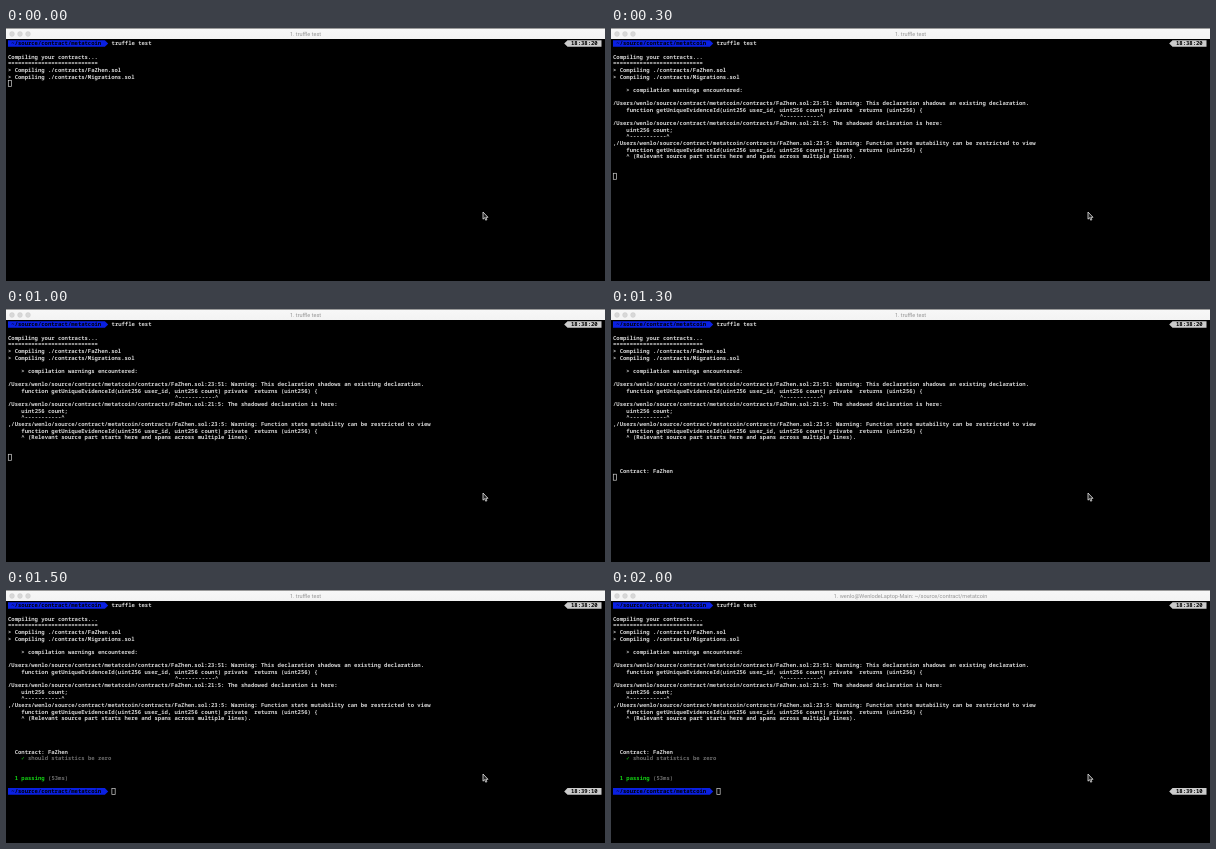
These frames come from a looping animation (599 by 253 pixels, 2100 ms). An HTML page:

```html
<!DOCTYPE html>
<html lang="en">
<head>
<meta charset="utf-8">
<title>Terminal</title>
<style>
  html, body { margin: 0; width: 100%; height: 100%; overflow: hidden; background: #000; }
  svg { display: block; width: 599px; height: 253px; }
  text { white-space: pre; text-rendering: geometricPrecision; }
  .mono { font: 600 5.568px "Noto Sans Mono", "DejaVu Sans Mono", monospace; fill: #d4d4d4; }
  .title { font: 5.55px Roboto, "Open Sans", sans-serif; fill: #959595; text-anchor: middle; }
  .mono.green { fill: #12d012; }
  .mono.dim { fill: #6c6c6c; }
  .mono.dark { fill: #000; }
</style>
</head>
<body>
<svg id="stage" viewBox="0 0 599 253">
  <defs>
    <linearGradient id="bar" x2="0" y2="1">
      <stop offset="0" stop-color="#f8f8f8"/>
      <stop offset="1" stop-color="#f3f3f3"/>
    </linearGradient>
  </defs>
  <rect width="599" height="253"/>
  <rect width="599" height="11" fill="url(#bar)"/>
  <rect width="599" height="0.8" fill="#858585"/>
  <g fill="#d8d8d8" stroke="#c6c6c6" stroke-width="0.4">
    <circle cx="6" cy="6" r="2.4"/>
    <circle cx="14" cy="6" r="2.4"/>
    <circle cx="22" cy="6" r="2.4"/>
  </g>
  <text id="title" class="title" x="299.5" y="8"></text>
  <g id="screen"></g>
  <rect id="caret" width="3.3" height="6" fill="none" stroke="#cfcfcf" stroke-width="0.7"/>
  <path d="M477 184v7.2l1.6-1.5 1.1 2.5 1.2-.5-1.1-2.4h2.2z" fill="#222" stroke="#e8e8e8" stroke-width="0.8"/>
</svg>
<script>
const LOOP = 2100, COL = 3.341, ROW = 6.64, LEFT = 2, TOP = 12.2;
const NS = "http://www.w3.org/2000/svg";
const screen = document.getElementById("screen");
const title = document.getElementById("title");
const caret = document.getElementById("caret");
const timed = [];

const colX = c => LEFT + c * COL;
const rowY = r => TOP + r * ROW;

function add(tag, at, attrs, content = "") {
  const el = document.createElementNS(NS, tag);
  for (const k in attrs) el.setAttribute(k, attrs[k]);
  el.textContent = content;
  screen.append(el);
  timed.push({ el, at });
}

function print(at, row, col, content, tone = "", x = colX(col)) {
  add("text", at, { x, y: rowY(row) + 5.25, class: "mono " + tone }, content);
}

function prompt(at, row, clock) {
  const y = rowY(row), h = ROW / 2, end = colX(29);
  add("path", at, { d: `M${LEFT} ${y}H${end}l3.3 ${h}l-3.3 ${h}H${LEFT}z`, fill: "#0a20e2" });
  print(at, row, 1, "~/source/contract/metatcoin", "dark");
  add("path", at, { d: `M595.5 ${y}H561.5l-3.3 ${h}l3.3 ${h}H595.5z`, fill: "#cbcbcb" });
  print(at, row, 0, clock, "dark", 565);
}

const file = "/Users/wenlo/source/contract/metatcoin/contracts/FaZhen.sol";
const code = "function getUniqueEvidenceId(uint256 user_id, uint256 count) private  returns (uint256) {";
const span = "^-----------^";

prompt(0, 0, "18:38:20");

// time, row, column, text, tone
[
  [0, 0, 31, "truffle test"],
  [0, 2, 0, "Compiling your contracts..."],
  [0, 3, 0, "=".repeat(27)],
  [0, 4, 0, "> Compiling ./contracts/FaZhen.sol"],
  [0, 5, 0, "> Compiling ./contracts/Migrations.sol"],
  [300, 7, 4, "> compilation warnings encountered:"],
  [300, 9, 0, file + ":23:51: Warning: This declaration shadows an existing declaration."],
  [300, 10, 4, code],
  [300, 11, 50, span],
  [300, 12, 0, file + ":21:5: The shadowed declaration is here:"],
  [300, 13, 4, "uint256 count;"],
  [300, 14, 4, span],
  [300, 15, 0, "," + file + ":23:5: Warning: Function state mutability can be restricted to view"],
  [300, 16, 4, code],
  [300, 17, 4, "^ (Relevant source part starts here and spans across multiple lines)."],
  [1300, 22, 2, "Contract: FaZhen"],
  [1400, 23, 4, "✓", "green"],
  [1400, 23, 6, "should statistics be zero", "dim"],
  [1400, 26, 2, "1 passing", "green"],
  [1400, 26, 12, "(53ms)", "dim"],
].forEach(line => print(...line));

prompt(1500, 28, "18:39:10");

// time, row, column
const carets = [[0, 6, 0], [300, 20, 0], [1300, 23, 0], [1400, 28, 0], [1500, 28, 31]];
const titles = [
  [0, "1. truffle test"],
  [1600, "1. wenlo@WenlodeLaptop-Main: ~/source/contract/metatcoin"],
];
const current = (steps, t) => steps.filter(s => s[0] <= t).pop();

function draw(now) {
  const t = now % LOOP;
  for (const { el, at } of timed) el.style.display = t >= at ? "" : "none";
  const [, row, col] = current(carets, t);
  caret.setAttribute("x", colX(col) + 0.3);
  caret.setAttribute("y", rowY(row) + 0.3);
  title.textContent = current(titles, t)[1];
}

const start = performance.now();
function tick() {
  draw(performance.now() - start);
  requestAnimationFrame(tick);
}
tick();
</script>
</body>
</html>
```
